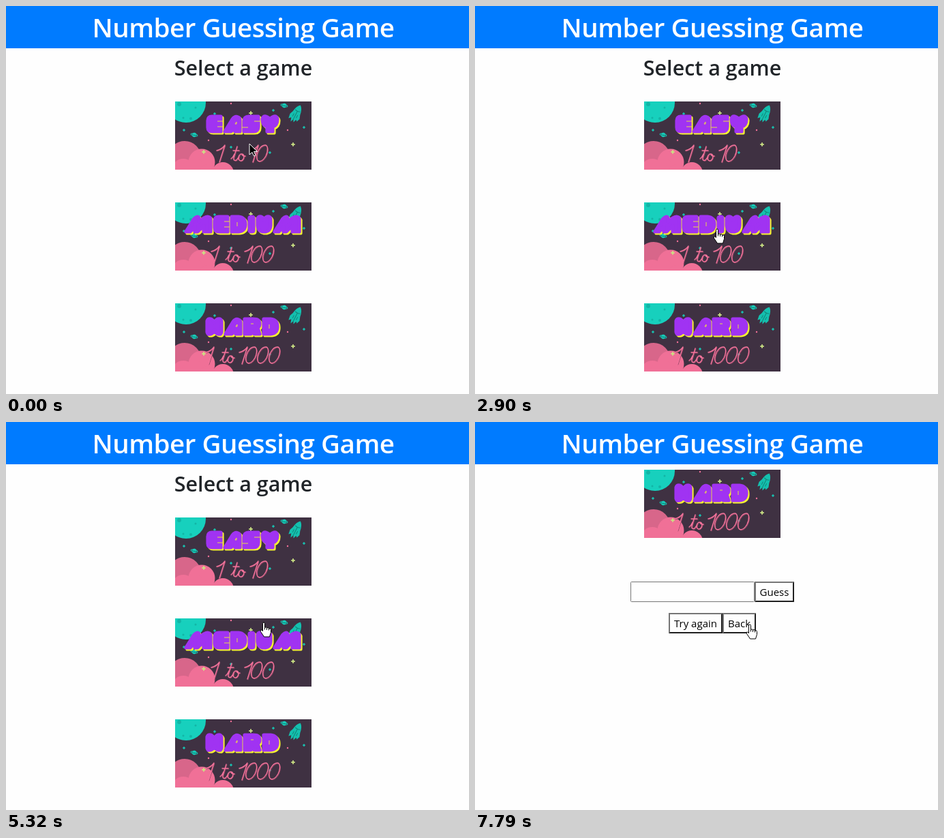
An HTML page that plays this animation: 679x569 px, repeating every 8 s.

```html
<!DOCTYPE html>
<html lang="en">
<head>
<meta charset="utf-8">
<title>Number Guessing Game</title>
<style>
  html, body { margin: 0; width: 100%; height: 100%; overflow: hidden; background: #fefefe; }
  svg { display: block; }
  text { font-family: "Open Sans", "Noto Sans", sans-serif; text-anchor: middle; }
  .face { fill: #a033f2; stroke: #a033f2; }
  .shade { fill: #f8f431; stroke: #f8f431; }
  .slit { fill: none; stroke: #e9d84a; stroke-width: 1; }
  .script { fill: none; stroke-linecap: round; stroke-linejoin: round; }
</style>
</head>
<body>
<svg id="stage" width="679" height="569" viewBox="0 0 679 569"></svg>
<script>
// Bubble letters, 28 px high: [advance, outline, slits]
const GLYPHS = {
  E: [25, 'M3 9Q3 3 9 3H22V25H9Q3 25 3 19Z', 'M17 10H25M17 18H25'],
  A: [28, 'M3 25L14 7Q18 2 22 4Q25 5 25 8V25H18V19L12 25Z', 'M18 14L20 11V14Z'],
  S: [27, 'M10 3H24V18Q24 25 17 25H3V10Q3 3 10 3Z', 'M18 10H27M0 19H9'],
  Y: [28, 'M3 7Q4 2 8 3Q12 4 14 8Q16 4 20 3Q24 2 25 7Q25 16 18 18V25H10V18Q3 16 3 7Z', ''],
  M: [42, 'M3 25L15 6Q20 1 22 5V11L29 5Q37 1 39 6V25H29V16L20 25H16V17L9 25Z', ''],
  D: [26, 'M3 3H13Q23 4 23 14T13 25H3Z', 'M11 11V17'],
  I: [12, 'M3 5Q3 3 6 3T9 5V23Q9 25 6 25T3 23Z', ''],
  U: [25, 'M3 6Q4 2 8 3Q11 4 12.5 8Q14 4 17 3Q21 2 22 6V16Q21 25 12.5 25T3 16Z', ''],
  H: [27, 'M3 6Q4 2 8 3Q11 4 13.5 8Q16 4 19 3Q23 2 24 6V22Q23 26 19 25Q16 24 13.5 20Q11 24 8 25Q4 26 3 22Z', ''],
  R: [28, 'M3 3H16Q25 3 25 10Q25 14 22 16L25 25H17L14 21L12 25H3Z', 'M12 10H16']
};
const ONE = 'M0 8Q8 6 12 0L4 25';
const TO = 'M0 20Q3 18 5 13M9 2L4 18Q3 24 8 22Q11 19 12 15M3 8H12M16 13C11 12 9 23 14 23C19 23 21 13 16 13Q17 17 21 16';
const ZERO = 'M13 0C6 0-1 12 1 20C2 26 9 25 14 16C18 8 17 0 13 0Z';

const at = (x, y, body) => `<g transform="translate(${x} ${y})">${body}</g>`;
const circle = (x, y, r, fill) => `<circle cx="${x}" cy="${y}" r="${r}" fill="${fill}"/>`;
const star = (x, y, r, fill) => at(x, y,
  `<path d="M0 ${-r}Q0 0 ${r} 0Q0 0 0 ${r}Q0 0 ${-r} 0Q0 0 0 ${-r}Z" fill="${fill}" stroke="${fill}"/>`);
const planet = (x, y) => `<g transform="translate(${x} ${y}) rotate(12)">
  <circle r="3.2" fill="#17cbb8"/><ellipse rx="5" ry="1.5" fill="none" stroke="#17cbb8"/>
  <path d="M-3 .5H3" stroke="#10766f"/></g>`;

const SPACE = `<path fill="#3f3142" d="M0 0H200V100H0Z"/>
  ${circle(16, 2, 29, '#17d0bd')}
  ${[[6, 4, 3], [23, 25, 2], [12, 24, 1.5], [30, 9, 1.5]].map(c => circle(...c, '#12b5a6')).join('')}
  ${circle(14, 82, 24, '#d8668a')}
  ${[[39, 89, 19.5], [12, 101, 17], [70, 105, 16], [28, 104, 20], [48, 104, 12]].map(c => circle(...c, '#f07097')).join('')}
  ${[[82, 3], [49, 57], [165, 42]].map(p => circle(...p, 1.2, '#f07097')).join('')}
  ${[[13, 42], [58, 18], [144, 13], [189, 38], [139, 75], [82, 67]].map(p => star(...p, 1.7, '#17cbb8')).join('')}
  ${[[111, 17], [173, 63], [42, 74]].map(p => star(...p, 2.8, '#cbe384')).join('')}
  ${planet(28, 49)}${planet(160, 6)}
  <g transform="translate(178 17) rotate(27)" fill="#14c0af">
    <path d="M0-13Q5-9 6 0L8 6L6 11L4 9L2 14L0 10L-2 15L-4 9L-7 12L-8 5L-6 0Q-5-9 0-13Z"/>
    <path d="M0-3V11M-4-4Q0-2 4-4M-3 2V7M3 2V7" fill="none" stroke="#128579"/>
  </g>`;

function word(text, x, y) {
  const layer = (cls, part) => {
    let pen = 0;
    return [...text].map(ch => {
      const g = at(pen, 0, `<path class="${cls}" d="${GLYPHS[ch][part]}"/>`);
      pen += GLYPHS[ch][0];
      return g;
    }).join('');
  };
  return `<g stroke-width="5.2" stroke-linejoin="round">
    ${at(x + 2, y + 2, layer('shade', 1))}${at(x, y, layer('face', 1))}</g>
    ${at(x, y, layer('slit', 2))}`;
}

function range(x, zeros) {
  const put = (dx, d) => at(x + dx, 64, `<path d="${d}"/>`);
  let s = put(0, ONE) + put(21, TO) + put(49, ONE);
  for (let i = 0; i < zeros; i++) s += put(58 + 17 * i, ZERO);
  return `<g class="script" stroke="#9c4968" transform="translate(.9 .9)">${s}</g>
    <g class="script" stroke="#f4749c" stroke-width="1.4">${s}</g>`;
}

const card = (i, text, x, y, scriptX) =>
  `<symbol id="card${i}" viewBox="0 0 200 100">${SPACE}${word(text, x, y)}${range(scriptX, i + 1)}</symbol>`;
const useCard = (i, y, id = '') => `<use ${id} href="#card${i}" x="248" y="${y}" width="200" height="100"/>`;

function button(id, x, y, w, label) {
  const r = x + w, b = y + 30;
  return `<rect id="${id}" x="${x}" y="${y}" width="${w}" height="30" fill="#fefefe"/>
    <path fill="#767676" d="M${x} ${y}H${r}L${r - 2} ${y + 2}H${x + 2}V${b - 2}L${x} ${b}Z"/>
    <path fill="#212121" d="M${r} ${b}H${x}L${x + 2} ${b - 2}H${r - 2}V${y + 2}L${r} ${y}Z"/>
    <text x="${x + w / 2}" y="${y + 21}" font-size="15" fill="#000">${label}</text>`;
}

const stage = document.getElementById('stage');
stage.innerHTML = `<defs>
    ${card(0, 'EASY', 45, 19, 61)}${card(1, 'MEDIUM', 13, 18, 53)}${card(2, 'HARD', 44, 20, 45)}
  </defs>
  <path fill="#007bff" d="M0 0H679V62H0Z"/>
  <text x="348" y="46" font-size="38.6" font-weight="600" letter-spacing="-.5" fill="#fff">Number Guessing Game</text>
  <g id="menu">
    <text x="348" y="102" font-size="30.5" font-weight="600" fill="#212529">Select a game</text>
    ${[0, 1, 2].map(i => useCard(i, 140 + 148 * i)).join('')}
  </g>
  <g id="game">
    ${useCard(0, 70, 'id="banner"')}
    <rect id="field" x="228.5" y="234.5" width="181" height="29" rx="1" fill="#fefefe"/>
    ${button('guess', 410, 234, 58, 'Guess')}
    ${button('again', 284, 280, 79, 'Try again')}
    ${button('back', 363, 280, 49, 'Back')}
    <rect id="ring" x="364" y="281" width="47" height="28" rx="2.5" fill="none" stroke="#101010" stroke-width="2"/>
  </g>
  <g id="pointer">
    <path id="arrow" fill="#000" stroke="#fff" d="M0 0V16L4 12.5L6.5 18L9 17L6.5 11.5H11.5Z"/>
    <path id="hand" fill="#fff" stroke="#000" transform="translate(-6.5 -1.5)"
      d="M4 13V2Q4 .5 5.5 .5T7 2V8Q9.5 6.5 10 8.5Q12.5 7 13 9.5Q16 8.5 16 11V15L14 21.5H6L1 14Q0 11 2 11.5ZM7 8V11M10 8.5V11.5M13 9.5V12"/>
    <path id="beam" fill="none" stroke="#000" d="M-3-8H3M0-8V8M-3 8H3"/>
  </g>`;

const el = id => document.getElementById(id);
const show = (id, on) => el(id).setAttribute('visibility', on ? 'inherit' : 'hidden');

// [ms, game (-1 is the menu), pointer x, y, pointer shape, back focused]
const MENU = -1;
const STEPS = [
  [0, MENU, 357, 202, 'arrow'],
  [150, 0, 357, 202, 'arrow'],
  [300, 0, 357, 202, 'hand'],
  [760, 0, 366, 221, 'arrow'],
  [880, 0, 379, 247, 'beam'],
  [1030, 0, 384, 267, 'arrow'],
  [1150, 0, 389, 285, 'hand'],
  [1270, 0, 392, 293, 'hand'],
  [1950, 0, 392, 293, 'hand', true],
  [2350, MENU, 392, 293, 'hand'],
  [2780, MENU, 371, 312, 'hand'],
  [2900, MENU, 356, 328, 'hand'],
  [3490, 1, 356, 328, 'hand'],
  [4260, 1, 359, 323, 'arrow'],
  [4380, 1, 365, 313, 'arrow'],
  [4500, 1, 372, 303, 'hand'],
  [4630, 1, 377, 297, 'hand'],
  [4750, 1, 379, 295, 'hand'],
  [4890, 1, 379, 295, 'hand', true],
  [5320, MENU, 379, 295, 'hand'],
  [5600, MENU, 374, 322, 'hand'],
  [5720, MENU, 366, 363, 'hand'],
  [5870, MENU, 341, 425, 'arrow'],
  [5990, MENU, 315, 487, 'hand'],
  [6390, MENU, 315, 488, 'arrow'],
  [6540, 2, 315, 488, 'arrow'],
  [6660, 2, 315, 487, 'hand'],
  [6810, 2, 348, 420, 'arrow'],
  [6940, 2, 384, 355, 'arrow'],
  [7090, 2, 387, 320, 'arrow'],
  [7220, 2, 390, 290, 'hand'],
  [7360, 2, 389, 287, 'hand'],
  [7790, 2, 404, 298, 'hand']
];

function draw(now) {
  const t = now % 8000;
  const [, game, x, y, shape, focus] = STEPS.findLast(s => s[0] <= t);
  show('menu', game === MENU);
  show('game', game !== MENU);
  if (game !== MENU) el('banner').setAttribute('href', '#card' + game);
  show('ring', focus);
  const grey = game === 0 && t >= 1150;
  el('again').setAttribute('fill', grey ? '#efefef' : '#fefefe');
  el('back').setAttribute('fill', grey || focus ? '#efefef' : '#fefefe');
  el('field').setAttribute('stroke', shape === 'beam' ? '#4f4f4f' : '#767676');
  for (const id of ['arrow', 'hand', 'beam']) show(id, id === shape);
  el('pointer').setAttribute('transform', `translate(${x} ${y})`);
}

const start = performance.now();
function tick() {
  draw(performance.now() - start);
  requestAnimationFrame(tick);
}
tick();
</script>
</body>
</html>
```
